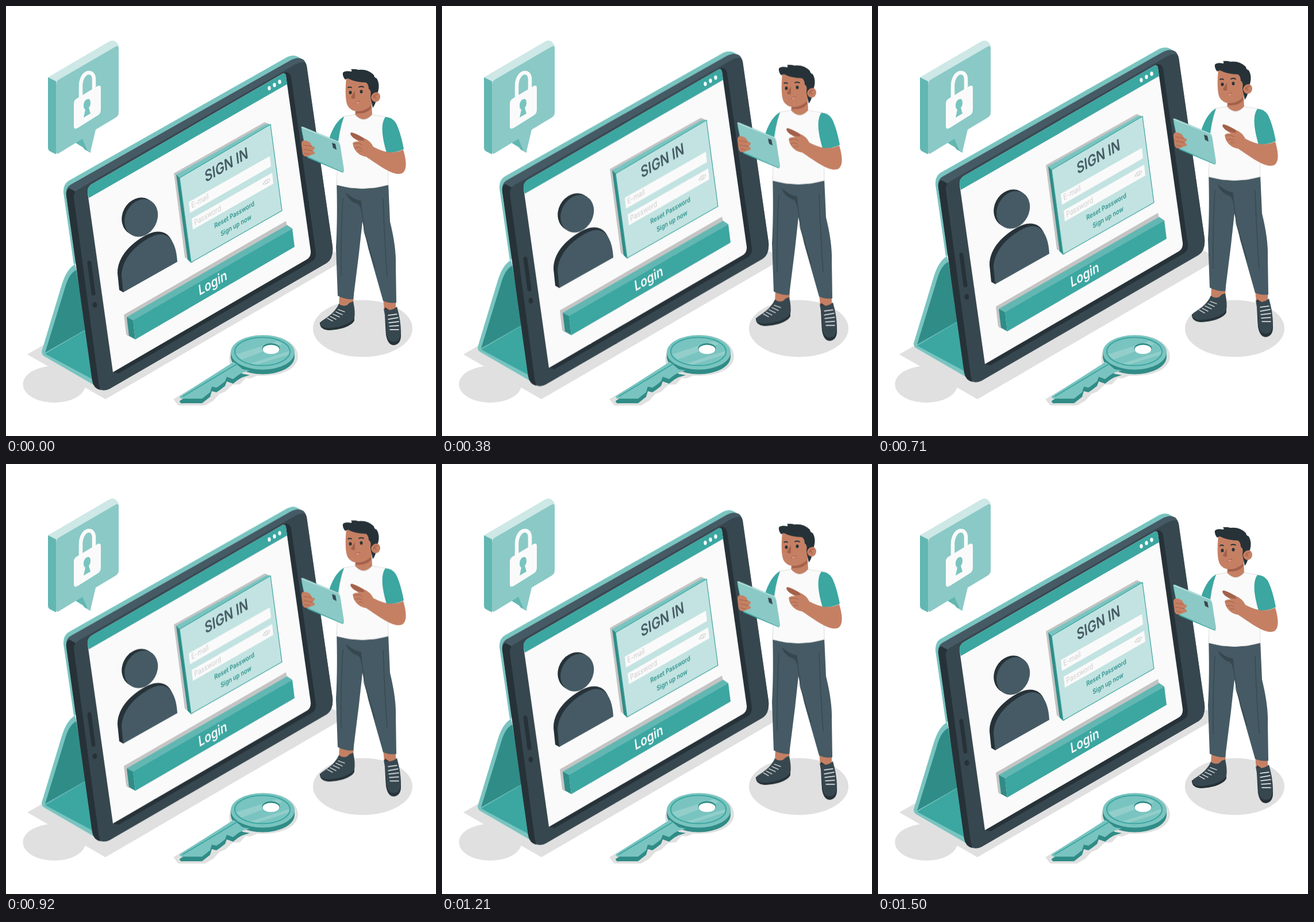
These frames come from a looping animation (748x748 px, 1.54 s). An HTML page:

```html
<!DOCTYPE html>
<html lang="en">
<head>
<meta charset="utf-8">
<title>Sign in</title>
<style>
  html, body { margin: 0; width: 100%; height: 100%; overflow: hidden; background: #fff; }
  svg { display: block; width: 100%; height: 100%; }
  text { font-family: Inter, Roboto, sans-serif; font-weight: 600; }

  .shade { fill: #e0e0e0; }
  .drop { fill: #c4c4c4; }
  .white { fill: #fafafa; }
  .teal { fill: #3ca6a1; }
  .deep { fill: #308c87; }
  .mid { fill: #62b7b2; }
  .light { fill: #79c4c0; }
  .soft { fill: #8ac9c6; }
  .pale { fill: #cde8e6; }
  .card { fill: #c2e3e1; }
  .ink { fill: #263238; }
  .slate { fill: #37474f; }
  .steel { fill: #455a64; }
  .skin { fill: #c58064; }
  .tan { fill: #a3614b; }
  .hint { fill: #cfcfcf; font-weight: 400; font-size: 12px; }
  .link { fill: #309590; font-size: 10.7px; }
  .line { fill: none; stroke-linecap: round; stroke-linejoin: round; }

  /* rises and sinks at 24 pictures a second, then rests for one */
  .float { animation: float 1540ms -6ms infinite; }
  @keyframes float {
    0% { transform: translateY(0); animation-timing-function: steps(18); }
    48.649% { transform: translateY(-14.96px); animation-timing-function: steps(18); }
    97.297%, 100% { transform: translateY(0); }
  }
</style>
</head>
<body>
<svg viewBox="0 0 748 748">
  <defs>
    <g id="keyShape">
      <ellipse cx="446.500" cy="602.500" rx="55.500" ry="30"/>
      <path d="M396 619L412 632L424 634L411 638L404 642L395 649L384 645L381 653L372 660L366 664L358 662L355 672L341 683L309 683Q302 684 302 679Z"/>
    </g>
  </defs>

  <g class="shade">
    <path d="M37 606L100 570L500 400L570 427L592 440L173 684Z"/>
    <ellipse cx="84" cy="658" rx="54.500" ry="32"/>
    <ellipse cx="620.500" cy="561" rx="86.500" ry="49.500"/>
    <path d="M291 684L390 625C383 600 400 578 435 573C475 568 508 585 508 610C507 632 478 645 437 643L425 648L417 647L407 658L394 659L381 671L371 675L362 685L360 687L346 695L300 695Z"/>
  </g>

  <g id="key">
    <use href="#keyShape" y="8" class="deep"/>
    <path class="deep" d="M391 602V611L502 611V602Z"/>
    <use href="#keyShape" class="light"/>
    <g fill="#a5d6d3" opacity=".6">
      <path d="M400 606L473 583L481 588L410 615Z"/>
      <path d="M425 622L494 600L492 606L436 624Z"/>
    </g>
    <g class="line" stroke="#3ca6a1" stroke-width="2">
      <ellipse cx="446" cy="601" rx="48" ry="24.500"/>
      <path d="M403 622L308 679"/>
    </g>
    <ellipse class="deep" cx="461" cy="596" rx="15.500" ry="9.500"/>
    <ellipse cx="461" cy="597.500" rx="14.500" ry="8" fill="#fff"/>
  </g>

  <g id="bubble">
    <path class="pale" d="M73 124L179 62Q185 58 191 62L196 68L180 84L87 133Z"/>
    <path class="mid" d="M73 124L87 131V258L77 253Q73 251 73 246Z"/>
    <path class="mid" d="M121 238L136 228L148 255L139 251Q136 250 134 246Z"/>
    <path class="soft" d="M87 137Q87 131 92 128L190 71Q196 67 196 73V185Q196 191 191 194L156 215L147 253Q145 257 142 252L133 231L92 256Q87 259 87 253Z"/>
    <path class="line" stroke="#fafafa" stroke-width="6.500" d="M130 162V139C130 127 136 117 143 116C150 115 153 121 153 128V148"/>
    <path class="white" d="M118 170Q118 164 123 161L158 140Q165 136 165 143V180Q165 187 160 190L125 212Q118 216 118 209Z"/>
    <path class="light" d="M135 173C135 162 147 157 147 168Q147 174 144 177L147 187L135 194L138 180Q135 179 135 173Z"/>
  </g>

  <g id="tablet" class="float">
    <path class="light" d="M120 449C108 457 102 469 97 485L62 601Q62 606 66 609L154 660L156 590Z"/>
    <path class="deep" d="M122 459C111 466 107 476 103 489L68 603L140 562Z"/>
    <path class="teal" d="M68 605L138 564L150 649Z"/>

    <path class="light" d="M118 450L100 325Q99 310 109 304L487 90Q501 82 512 91L517 110L130 440Z"/>
    <path class="steel" d="M105 330Q103 317 112 311L494 95Q508 87 517 93Q522 97 523 106L568 418Q570 439 558 447L180 666Q168 672 158 664Q152 660 150 652Z"/>
    <path class="ink" d="M105 330Q104 320 110 317L121 323L164 668Q152 665 150 652Z"/>
    <path class="slate" d="M118 334Q117 324 126 319L499 104Q513 96 520 98Q523 100 524 110L568 418Q570 439 558 447L180 666Q163 674 161 655Z"/>
    <path class="line" stroke="#263238" stroke-width="7" d="M145 447L152 500"/>
    <ellipse class="ink" cx="154.500" cy="520" rx="4" ry="5"/>

    <path class="ink" d="M142 322L486 115Q494 115 496 124L539 429Q540 440 531 445L196 639L186 637Z"/>
    <path class="white" d="M142 325Q141 315 149 310L479 119Q486 115 487 122L530 426Q531 436 523 441L186 637Z"/>
    <path class="teal" d="M142 325Q141 315 149 310L479 119Q486 115 487 121L489 136L144 334Z"/>
    <g fill="#fff">
      <ellipse cx="458" cy="143" rx="2.700" ry="3.700"/>
      <ellipse cx="467" cy="137.500" rx="2.700" ry="3.700"/>
      <ellipse cx="476" cy="132" rx="2.700" ry="3.700"/>
    </g>

    <g transform="rotate(28 235 367)">
      <ellipse class="ink" cx="231.500" cy="368" rx="29" ry="34"/>
      <ellipse class="steel" cx="236" cy="368.500" rx="27.500" ry="34"/>
    </g>
    <path class="ink" d="M204 498L197 494L194 465C193 436 220 409 249 396C268 388 283 394 289 410L240 470Z"/>
    <path class="steel" d="M204 498L201 469C201 440 227 413 256 400C282 389 296 410 298 445Z"/>

    <path class="drop" d="M292 291L450 202L462 207L324 447L311 437Z"/>
    <path class="light" d="M296 293L453 205L460 206L302 300Z"/>
    <path class="deep" d="M296 293L302 299L322 447L316 441Z"/>
    <path class="card" stroke="#3ca6a1" stroke-width="1.200" stroke-linejoin="round" d="M302 299L460 206L480 356L322 446Z"/>
    <path class="white" d="M318 341L459 261L461 279L320 360ZM323 370L463 290L465 309L325 389Z"/>
    <g class="line" stroke="#cfcfcf">
      <path d="M447 310Q450 301 459 301Q457 311 447 310Z"/>
      <ellipse cx="453" cy="306" rx="2.300" ry="2.800"/>
    </g>
    <text class="steel" font-size="24" transform="matrix(.84 -.485 .14 1.1 347 307)">SIGN IN</text>
    <text class="hint" transform="matrix(.84 -.485 .14 1.1 323 352)">E-mail</text>
    <text class="hint" transform="matrix(.84 -.485 .14 1.1 328 382)">Password</text>
    <text class="link" transform="matrix(.84 -.485 .14 1.1 363 387)">Reset Password</text>
    <text class="link" transform="matrix(.84 -.485 .14 1.1 374 401)">Sign up now</text>

    <path class="drop" d="M205 537L487 374L490 386L220 560L213 575L209 571Z"/>
    <path class="mid" d="M210 541L489 381L498 387L221 549Z"/>
    <path class="deep" d="M210 541L221 547L225 580L214 574Z"/>
    <path class="teal" d="M221 547L498 387L502 419L225 580Z"/>
    <text class="white" font-size="22" transform="matrix(.84 -.485 .14 1.1 336 504)">Login</text>
  </g>

  <g id="man" class="float">
    <path class="skin" d="M580 502H605L604 521Q592 526 579 524ZM656 508L678 510V530Q668 534 658 529Z"/>

    <path class="ink" d="M546 550Q545 562 560 564C578 564 601 558 606 547V540L560 550Z"/>
    <path class="slate" d="M579 518Q590 526 598 516L604 514Q608 532 606 543C600 553 578 560 560 560C548 560 544 553 549 548C558 542 572 534 579 518Z"/>
    <path class="ink" d="M659 524Q659 545 661 572Q664 590 675 590Q688 588 687 570L684 540Z"/>
    <path class="slate" d="M657 526Q668 533 680 523Q687 548 687 567Q686 584 675 584Q663 584 662 568Q661 548 657 526Z"/>
    <path class="line" stroke="#fafafa" stroke-width="1.300" d="M578 528L589 532M574 532L585 537M569 536L580 541M564 540L574 545M559 543L568 548M665 538L680 536M665 545L682 542M666 551L683 549M667 557L683 556M668 563L683 563"/>

    <path class="steel" d="M575 302Q620 320 665 308L668 375Q679 420 678 450L679 516Q668 518 656 513L630 421L620 375L614 430L604 510Q590 511 577 504L574 420Q577 370 575 302Z"/>
    <g class="line" stroke="#37474f" stroke-width="1.200">
      <path d="M622 374L623 392L642 455M656 335Q658 400 663 470M586 335Q582 400 583 470"/>
      <path fill="#37474f" d="M592 326Q606 338 617 339L621 374Q619 348 612 344Q598 340 592 326Z"/>
    </g>

    <path class="skin" d="M608 170L636 160L637 194Q622 206 607 194Z"/>
    <path class="tan" d="M609 181Q628 182 635 173L635 178Q628 188 609 187Z"/>
    <path class="white" stroke="#dedede" d="M588 192L607 189Q622 206 637 189L661 193L664 250L665 311Q620 324 575 311L578 245Q580 215 588 192Z"/>
    <path class="teal" d="M588 192C574 200 565 219 560 239L577 249Q578 220 588 192Z"/>
    <path class="teal" d="M660 193C652 204 653 225 662 255Q678 256 692 249Q686 218 678 203Q671 193 660 193Z"/>

    <path class="skin" d="M662 254Q678 256 691 250C697 270 698 286 689 291C674 297 649 277 626 262C613 261 604 248 604 242C601 237 607 235 614 236L604 229Q597 222 601 220Q607 221 621 229Q634 234 639 245Q654 253 669 255Z"/>
    <path class="tan" d="M601 220Q607 221 621 229L624 234Q614 235 605 230Q596 222 601 220Z"/>
    <path class="line" stroke="#a3614b" d="M606 240Q614 237 620 242M607 247Q613 244 619 248M613 252L619 252"/>

    <path class="teal" d="M513 212L524 264L586 290L588 286L525 240Z"/>
    <path class="soft" d="M514 212Q513 209 517 210L577 235Q580 236 581 240L588 285Q588 290 584 288L527 263Q524 262 523 258Z"/>
    <path class="line" stroke="#cde8e6" stroke-width="1.200" d="M514 211L577 236Q580 238 581 241"/>
    <path class="slate" d="M567 238L573 240L575 250L569 247Z"/>
    <path class="skin" d="M518 234Q514 234 514 240L516 257Q519 264 526 261L537 257Q538 253 533 252L537 248Q538 244 532 244L530 239Q526 234 518 234Z"/>
    <path class="line" stroke="#a3614b" d="M518 242L532 244M518 249L533 252M519 256L528 258"/>

    <path class="skin" d="M592 125C590 145 590 164 594 173Q600 184 614 183C627 182 636 174 637 160L636 124Z"/>
    <path class="ink" d="M635 147H646Q645 169 638 177L634 158Z"/>
    <ellipse class="skin" cx="643" cy="158" rx="8" ry="9"/>
    <path class="ink" d="M586 116Q585 122 590 128Q593 126 595 126Q608 133 626 133Q631 136 631 144Q636 147 635 158Q638 149 647 150Q651 136 645 126Q640 124 640 120Q629 109 613 111Q607 109 600 110Q603 113 600 114Q590 112 586 116Z"/>
    <path class="line" stroke="#a3614b" stroke-width="1.300" d="M639 160Q640 154 646 154M641 157L644 161"/>
    <path class="tan" d="M607 147L600 159Q601 162 607 161Z"/>
    <g class="ink">
      <ellipse cx="599" cy="150.500" rx="2.500" ry="3"/>
      <ellipse cx="618" cy="149" rx="2.500" ry="3"/>
    </g>
    <path class="line" stroke="#263238" stroke-width="1.800" d="M595 142Q598 140 601 142M614 141Q618 139 622 141"/>
    <path class="line" stroke="#a3614b" stroke-width="1.500" d="M608 169Q610 165 615 166"/>
    <path fill="#e58f8b" d="M608 168Q611 165 615 167L611 170Z"/>
  </g>
</svg>
</body>
</html>
```
